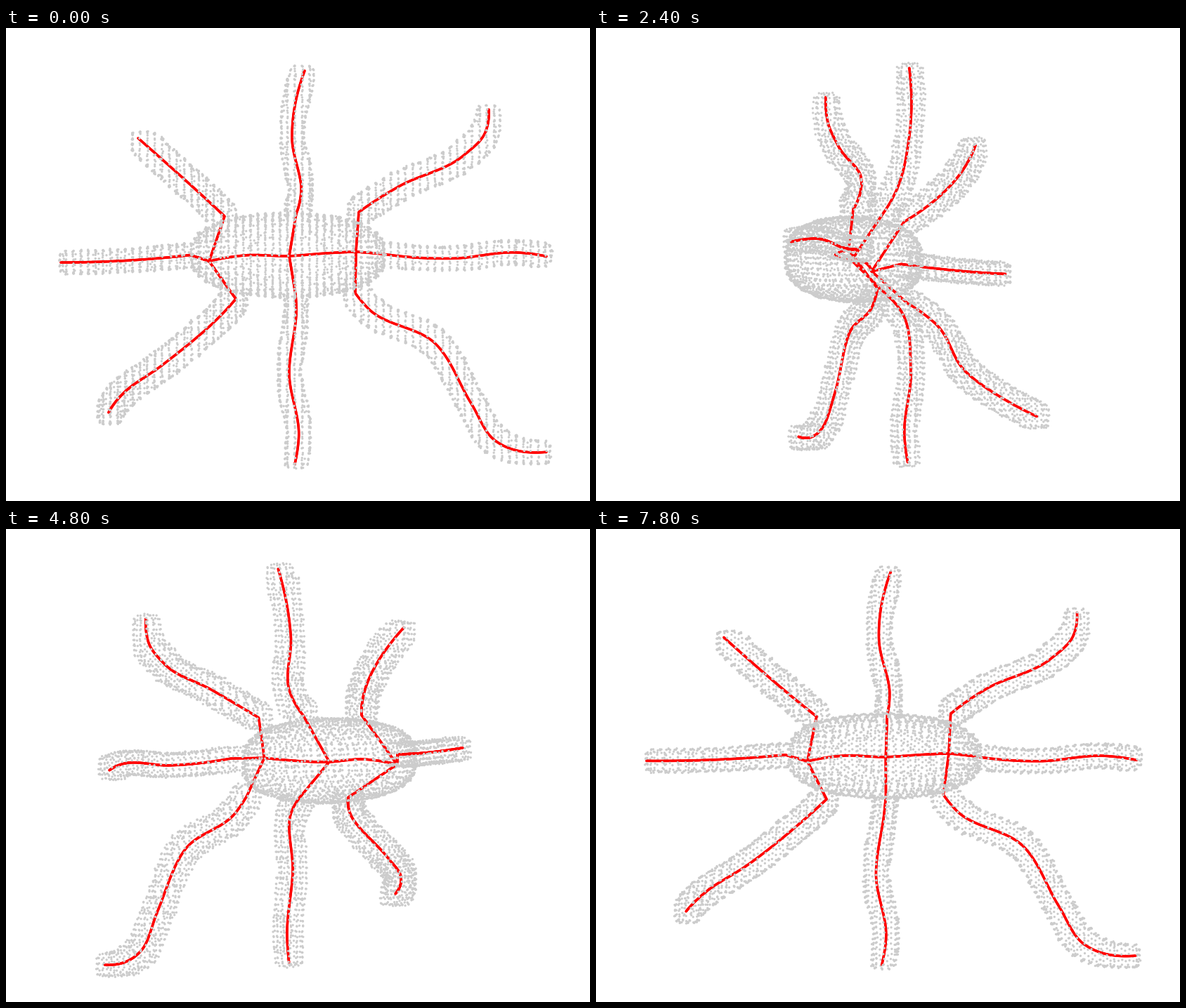
Animation of 831x674 px, one loop 8 s. Source, as a matplotlib script:

```python
import numpy as np
import matplotlib.pyplot as plt
from matplotlib.animation import FuncAnimation

W, H, DPI = 831, 674, 100
FRAMES = 40
AXIS_X = 415.5            # screen x of the turning axis
TILT = 0.07               # sine of the camera pitch
CELL = np.array([10.5, 7.5, 8.0])
LOW = np.array([-372.0, 42.0, -165.0])
HALF = 15.8               # half width of a square limb
GREY_DOT, RED_DOT = 3.3, 3.6

rng = np.random.default_rng(4)


def spline(points, n=40):
    """Smooth cubic curve through the points, timed by chord length."""
    p = np.asarray(points, float)
    s = np.r_[0, np.cumsum(np.linalg.norm(np.diff(p, axis=0), axis=1))]
    slope = np.gradient(p, s, axis=0, edge_order=2)
    t = np.linspace(0, 1, n)[:, None]
    parts = []
    for i, h in enumerate(np.diff(s)):
        parts.append((1 + 2 * t) * (1 - t)**2 * p[i] + t**2 * (3 - 2 * t) * p[i + 1]
                     + h * t * (1 - t) * ((1 - t) * slope[i] - t * slope[i + 1]))
    return np.vstack(parts)


def resample(path, step):
    """Spread points evenly along a path."""
    length = np.r_[0, np.cumsum(np.linalg.norm(np.diff(path, axis=0), axis=1))]
    s = np.linspace(0, length[-1], int(length[-1] / step) + 1)
    return np.column_stack([np.interp(s, length, path[:, k]) for k in range(3)])


# Key points are (x, y, z): x right, y down, z away from the viewer.
hub_l, hub_m, hub_r = (-126.5, 337, -65.5), (-12.5, 329, -58.5), (82.5, 321, -32)

bones = [spline([hub_l, (-75, 328, -58), hub_m, (35, 326, -67), hub_r])]
tubes = []


def limb(hub, *nodes, trim=2):
    """A straight spoke inside the body, then a curved, covered limb."""
    curve = spline(nodes)
    bones.append(np.vstack([hub, curve]))
    path = resample(curve, 5)
    tubes.append(path[:len(path) - trim])


# up, down, left, right
limb(hub_m, (-2.5, 265, -9), (4.5, 232, 14), (-8.5, 155, 29), (9.5, 58.5, 35))
limb(hub_m, (-3.5, 380, -3), (-2.5, 404, 19), (-12.5, 490, 30), (1, 583, 25),
     (-4.5, 619, 28))
limb(hub_l, (-153, 325.5, -30), (-250, 330, 25), (-337.5, 329.5, 66), trim=3)
limb(hub_r, (119, 322, -2), (220, 328, 5), (310, 320.5, -9), (353.5, 327.5, -30))
# diagonals on the right
limb(hub_r, (86.5, 264, -24), (145, 224.5, 7), (235, 182, 1), (266, 150, -4),
     (271.5, 116.5, -5))
limb(hub_r, (81.5, 377, 11), (100, 399, 11), (195, 449, 5), (246.5, 535, 1),
     (280, 588, -7), (353.5, 605.5, -19))
# diagonals on the left
limb(hub_l, (-104.5, 269, -10), (-145.5, 228, 33), (-227.5, 153, 57))
limb(hub_l, (-88.5, 386, 0), (-115.5, 413, 32), (-195, 478, 53), (-245, 511, 88),
     (-269.5, 538.5, 135), trim=0)


def solid():
    """Field that is positive inside the body and the limbs."""
    gx, gy, gz = np.ix_(*[np.arange(a, b, c)
                          for a, b, c in zip(LOW, (372, 642, 165), CELL)])
    body = ((gx + 14) / 138)**2 + ((gz + 56) / 92)**2 + abs((gy - 327.5) / 60)**2.8
    field = 60 * (1 - np.sqrt(body))
    for x, y, z in np.vstack(tubes):
        box = np.maximum(np.maximum(abs(gx - x), abs(gy - y)), abs(gz - z))
        np.maximum(field, HALF - box, out=field)
    return field


def surface(field):
    """Points where the grid edges cross the zero level."""
    found = []
    for axis in range(3):
        f = np.swapaxes(field, axis, 0)
        a, b = f[:-1], f[1:]
        hit = (a > 0) != (b > 0)
        at = np.argwhere(hit).astype(float)
        at[:, 0] += a[hit] / (a[hit] - b[hit])
        at[:, [0, axis]] = at[:, [axis, 0]]
        found.append(LOW + CELL * at)
    points = np.vstack(found)
    return points + rng.normal(0, 0.6, points.shape)


skin = surface(solid())
bone = np.vstack([resample(b, 1.0) for b in bones])
cloud = np.vstack([skin, bone])
is_bone = np.arange(len(cloud)) >= len(skin)
colors = np.where(is_bone[:, None], (1, 0, 0, 1), (0.8, 0.8, 0.8, 1))
sizes = (np.where(is_bone, RED_DOT, GREY_DOT) * 72 / DPI)**2

fig = plt.figure(figsize=(W / DPI, H / DPI), dpi=DPI, facecolor="white")
ax = fig.add_axes([0, 0, 1, 1])
ax.set_xlim(0, W)
ax.set_ylim(H, 0)
ax.axis("off")
dots = ax.scatter(cloud[:, 0], cloud[:, 1], s=sizes, c=colors, linewidths=0)


def draw(i):
    turn = 2 * np.pi * i / FRAMES
    x, y, z = cloud.T
    depth = z * np.cos(turn) - x * np.sin(turn)
    across = x * np.cos(turn) + z * np.sin(turn)
    order = np.argsort(-depth)
    spots = np.column_stack([AXIS_X + across, y + TILT * depth])
    dots.set_offsets(spots[order])
    dots.set_facecolors(colors[order])
    dots.set_sizes(sizes[order])
    return dots,


anim = FuncAnimation(fig, draw, frames=FRAMES, interval=200, repeat=True,
                     repeat_delay=0, blit=False)
plt.show()
```
